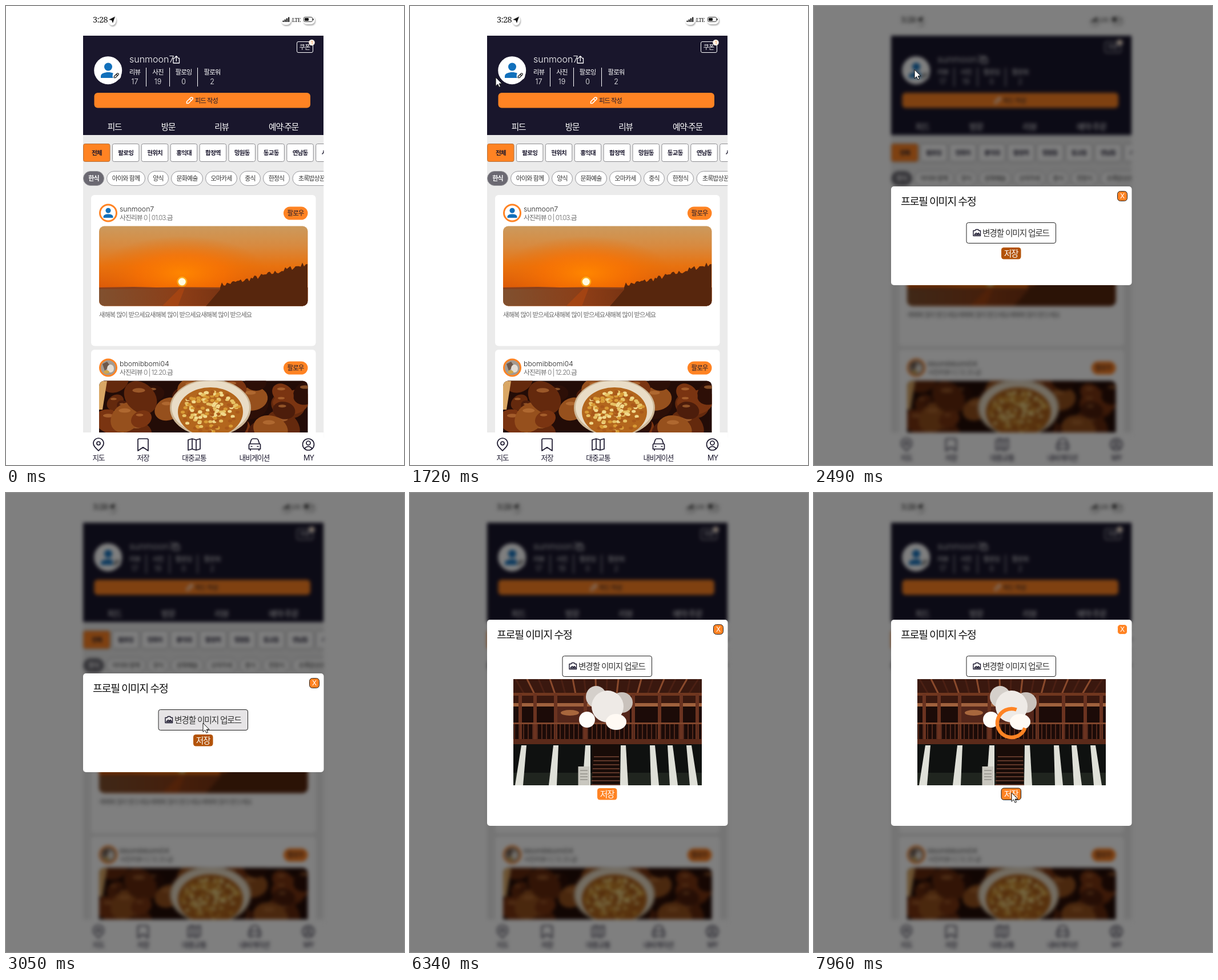
Animation, 697 px wide and 804 px high, one loop 8 s. Source, as an HTML page:

```html
<!DOCTYPE html>
<html lang="ko">
<head>
<meta charset="utf-8">
<title>프로필 이미지 수정</title>
<style>
  html, body { margin: 0; width: 100%; height: 100%; overflow: hidden; background: #fff; }
  svg { display: block; }
  text {
    font-family: Inter, "Noto Sans CJK KR", "Noto Sans CJK", sans-serif;
    letter-spacing: -.08em; white-space: pre;
  }
  .latin { letter-spacing: 0; }
  .serif { font-family: "Noto Serif", "Liberation Serif", serif; letter-spacing: -.04em; }
  .sticker { filter: drop-shadow(1px 2px 1px #0005); }
</style>
</head>
<body>
<svg id="stage" width="697" height="804" viewBox="0 0 697 804"></svg>
<script>
const LOOP = 8000;
const ORANGE = '#ff8323', NAVY = '#19162c';
const USER = 'sunmoon7', FRIEND = 'bbomibbomi04';

let seed = 7;
const random = () => (seed = (seed * 16807) % 2147483647) / 2147483647;
const repeat = (n, fn) => Array.from({ length: n }, (_, i) => fn(i)).join('');

const rect = (x, y, w, h, r, fill, extra = '') =>
  `<rect x="${x}" y="${y}" width="${w}" height="${h}" rx="${r}" fill="${fill}" ${extra}/>`;
const oval = (x, y, rx, ry, fill, extra = '') =>
  `<ellipse cx="${x}" cy="${y}" rx="${rx}" ry="${ry}" fill="${fill}" ${extra}/>`;
const path = (d, fill, extra = '') => `<path d="${d}" fill="${fill}" ${extra}/>`;
const line = (d, color, width = 1) =>
  path(d, 'none', `stroke="${color}" stroke-width="${width}" stroke-linejoin="round"`);
const label = (x, y, s, size, fill, extra = '') =>
  `<text x="${x}" y="${y}" font-size="${size}" fill="${fill}" ${extra}>${s}</text>`;
const centered = (x, y, s, size, fill, extra = '') =>
  label(x, y, s, size, fill, `text-anchor="middle" ${extra}`);
const gradient = (id, stops, attrs = 'x2="0" y2="1"', type = 'linear') =>
  `<${type}Gradient id="${id}" ${attrs}>${stops.map(([o, c, a = 1]) =>
    `<stop offset="${o}" stop-color="${c}" stop-opacity="${a}"/>`).join('')}</${type}Gradient>`;
const clip = (id, shape) => `<clipPath id="${id}">${shape}</clipPath>`;

const person = (x, y, scale, id) =>
  `<g id="${id}" fill="#1270bb" transform="translate(${x} ${y}) scale(${scale})">
    <circle cy="-6.5" r="7"/><path d="M-13 13v-3C-13 5-6 3 0 3s13 2 13 7v3z"/></g>`;
const pencil = (x, y, scale, color) =>
  `<g transform="translate(${x} ${y}) scale(${scale})">` +
  line('M-5 5v-3L2-5q1.5-1 3 0t0 3L-2 5zM0-3l3 3', color, 1.6) + '</g>';

function statusBar() {
  return label(152, 29, '3:28', 14.5, '#111', 'class="serif"') +
    '<g class="sticker">' + oval(186, 25, 7, 9, '#fff') + rect(482, 17, 17, 16, 7, '#fff') +
    rect(520, 17, 21, 15, 7, '#fff') + '</g>' +
    path('M180 24l11-5.5-4 11.5-2-5z', '#111') +
    repeat(4, i => rect(484.5 + i * 3.2, 25.5 - i * 2, 2.2, 2.5 + i * 2, .5, '#111')) +
    label(501, 28, 'LTE', 9, '#111', 'class="serif"') +
    rect(521.5, 19.5, 15, 8, 2, 'none', 'stroke="#333"') + rect(523, 21, 7, 5, 1, '#111') +
    rect(537.5, 22, 1.5, 3, .5, '#333');
}

function header() {
  const stats = [[225.5, '리뷰', 17], [266, '사진', 19], [311, '팔로잉', 0], [361, '팔로워', 2]];
  const tabs = [[190, '피드'], [284, '방문'], [377.5, '리뷰'], [486, '예약·주문']];
  return rect(135, 52, 421, 174, 0, NAVY) +
    rect(509.5, 62.5, 28, 19, 2.5, 'none', 'stroke="#fff"') + centered(523, 75.5, '쿠폰', 11, '#fff') +
    oval(535.5, 64, 5.3, 5.3, '#fff3e8') + centered(535.5, 66.5, '1', 7, ORANGE) +
    oval(178.7, 112.7, 24.5, 24.5, '#fff') + person(179, 113, 1, 'avatar') +
    oval(194, 122, 7.5, 7.5, '#fff') + pencil(193, 122, .75, '#111') +
    label(216, 99, USER, 16, '#fff', 'class="latin" font-weight="300"') +
    line('M295.5 91.500h-2.500v8.500h10.500v-8.500h-2.500M298.300 97v-9M295.500 90.500l2.800-2.800 2.800 2.800', '#fff', 1.3) +
    stats.map(([x, name, n]) => centered(x, 120, name, 11.5, '#fff') +
      centered(x, 137, n, 12.5, '#fff', 'class="latin" font-weight="300"')).join('') +
    line('M245.500 108v33M286.500 108v33M335.500 108v33', '#fff') +
    rect(154.5, 152, 378.5, 26.5, 6, ORANGE) + pencil(321.5, 165.5, 1, '#fff') +
    label(331, 169.5, '피드 작성', 11.2, NAVY) +
    tabs.map(([x, s]) => centered(x, 216.5, s, 14.6, '#fff')).join('');
}

function filters() {
  const areas = ['전체', '팔로잉', '현위치', '홍익대', '합정역', '망원동', '동교동', '연남동', '서교동'];
  const tags = [[135, 37, '한식'], [176, 68, '아이와 함께'], [248, 37, '양식'], [289, 56, '문화예술'],
    [349, 56, '오마카세'], [409, 37, '중식'], [450, 47, '한정식'], [501.5, 67, '초록밥상꾼']];
  return areas.map((s, i) => {
    const x = 135.5 + i * 50.9;
    return rect(x, 241.5, 46.5, 31, 3, i ? '#fff' : ORANGE, `stroke="${i ? '#8c8c90' : '#b5713c'}"`) +
      centered(x + 23.3, 261, s, 10.6, NAVY, 'font-weight="700"');
  }).join('') + tags.map(([x, w, s], i) =>
    rect(x + .5, 289.5, w - 1, 25, 12.5, i ? '#fff' : '#6b6972', 'stroke="#98989c"') +
    centered(x + w / 2, 305.7, s, 11, i ? '#333' : '#fff', i ? '' : 'font-weight="700"')).join('');
}

function postHead(y, name, date) {
  return label(199, y - 3.5, name, 12.3, '#222', 'class="latin" font-weight="300"') +
    label(199, y + 12, `사진리뷰 0 | ${date}`, 11.8, '#666', 'font-weight="300"') +
    rect(486, y - 11.5, 42.5, 23, 11.5, ORANGE) + centered(507, y + 4, '팔로우', 11.5, NAVY);
}

function sunset() {
  const trees = repeat(52, i => {
    const x = 375 + i * 3;
    return `L${x} ${493 - 38 * (i / 51) ** 1.2 - random() * 9}`;
  });
  return '<g clip-path="url(#photoA)">' + rect(163, 385, 366, 141, 0, 'url(#sky)') +
    oval(308, 468, 150, 65, 'url(#glow)') + rect(163, 493, 366, 33, 0, 'url(#sea)') +
    path('M163 493l60-1 40 1 45-.5 90 .5v3H163z', '#87401d') +
    path('M305 494h8l-12 32h-28z', '#b4490f', 'opacity=".6"') +
    path(`M350 526L375 497${trees}V526z`, '#57260d') +
    oval(308.3, 483, 9, 9, '#ffc02a', 'opacity=".7"') + oval(308.3, 483, 6.5, 6.5, '#fffbe0') + '</g>';
}

function food() {
  const browns = ['#7a3411', '#4d1d0b', '#96501d', '#64290d', '#2d0f07'];
  const bits = ['#e7c265', '#d89a35', '#f1d98c', '#a9591a'];
  const pieces = repeat(38, i => {
    const x = 163 + random() * 365, y = 657 + random() * 92, r = 10 + random() * 15;
    return oval(x, y, r * 1.3, r, browns[i % 5], `transform="rotate(${random() * 90 - 45} ${x} ${y})"`) +
      oval(x - 3, y - r / 2, r * .45, r * .16, '#c0793d', 'opacity=".6"');
  });
  const garlic = repeat(150, i => {
    const a = random() * 6.283, d = Math.sqrt(random());
    return oval(358 + 52 * d * Math.cos(a), 711 + 36 * d * Math.sin(a), 3.6, 2.6, bits[i % 4]);
  });
  return '<g clip-path="url(#photoB)">' + rect(163, 656, 366, 92, 0, '#230c07') + pieces +
    path('M163 657h14l-8 50h-6z', '#d9a765') +
    oval(358, 704, 71, 50, '#cdb797') + oval(358, 703, 68, 47, '#e9dcc6') +
    oval(358, 711, 57, 43, '#b3661d') + garlic + '</g>';
}

function posts() {
  const wish = '새해복 많이 받으세요';
  return rect(149, 331, 393.5, 264.5, 6, '#fff') +
    oval(179, 362.5, 14.5, 14.5, '#fff', `stroke="${ORANGE}" stroke-width="3"`) +
    person(179, 362.5, .65, 'thumb') + postHead(363, USER, '01.03.금') + sunset() +
    label(163, 545, wish + wish + wish, 11.2, '#666', 'font-weight="300"') +
    rect(149, 602, 393.5, 160, 6, '#fff') +
    oval(179, 633.5, 14.5, 14.5, '#a39a91', `stroke="${ORANGE}" stroke-width="3"`) +
    path('M169 627l8-4 5 7-9 9z', '#6d584b') + oval(183, 635, 6, 7, '#e3ddd5') + oval(176, 641, 5, 3, '#d2a54a') +
    postHead(634, FRIEND, '12.20.금') + food();
}

function navBar() {
  const items = [[162, '지도'], [240, '저장'], [329.5, '대중교통'], [435, '내비게이션'], [530, 'MY']];
  const icons = 'M162 779c-5-5-9-8-9-13a9 9 0 0 1 18 0c0 5-4 8-9 13zM159 766a3 3 0 1 0 6 0a3 3 0 1 0-6 0' +
    'M231 779V760q0-2 2-2h14q2 0 2 2v19l-9-6z' +
    'M319 760l7-2 7 2 7-2v18l-7 2-7-2-7 2zM326 758v18M333 760v18' +
    'M427 767l2.500-7q.7-2 3-2h6q2.300 0 3 2l2.500 7M427 767h17q1.500 0 1.500 2v7h-20v-7q0-2 1.500-2zM428 776v3M443 776v3M428.500 771.500h3M439.500 771.500h3' +
    'M519.500 768a10 10 0 1 0 20 0a10 10 0 1 0-20 0M526 765.500a3.500 3.500 0 1 0 7 0a3.500 3.500 0 1 0-7 0M523 775q6.500-7 13 0';
  return rect(135, 747, 421, 57, 0, '#fff') + line(icons, NAVY, 1.7) +
    items.map(([x, s]) => centered(x, 795.5, s, 12.6, NAVY)).join('');
}

function pavilion() {
  const beams = repeat(17, i => line(`M${185 + i * 20} 326L${200 + i * 18} 352`, i % 2 ? '#8a4a2c' : '#4b2014', 3));
  const columns = [190, 216, 252, 304, 388, 434, 472, 500];
  const pillars = [[195, -8], [251, -5], [307, -2], [369, 2], [420, 5], [451, 7], [484, 9]];
  return '<g clip-path="url(#photoC)">' + rect(181, 326, 330, 186, 0, '#1c0b08') +
    rect(181, 326, 330, 46, 0, '#3a180f') + beams +
    rect(181, 350, 330, 5, 0, '#71371f') + rect(181, 368, 330, 6, 0, '#a0613d') +
    rect(255, 374, 130, 30, 0, '#54261a') + oval(280, 385, 16, 5, '#a8673d') +
    columns.map(x => rect(x, 352, 6, 80, 0, '#6b3320')).join('') +
    rect(181, 402, 330, 3, 0, '#81462c') + rect(181, 431, 330, 9, 0, '#5b2a1a') +
    repeat(42, i => rect(182 + i * 8, 405, 2, 27, 0, '#53281b')) +
    rect(181, 440, 330, 72, 0, '#0f1110') + rect(181, 490, 330, 22, 0, '#20251f') +
    pillars.map(([x, lean]) => path(`M${x} 442h9l${lean + 2} 70h-14z`, '#dfe0d8')).join('') +
    rect(319, 440, 48, 72, 0, '#180c08') +
    repeat(8, i => rect(322 - i * .7, 461 + i * 7, 44 + i, 2, 0, '#60382a')) +
    rect(294.5, 479, 20, 33, 0, '#c9c7bf') +
    line('M298 486h13M298 492h13M298 497h13M298 502h13', '#77756f') +
    oval(326, 357, 18, 19, '#d5d0cb') + oval(371, 367, 19, 18, '#c9c2bc') +
    oval(346, 374, 28, 28, '#eeeae6') + oval(310, 397, 14, 14, '#fffdf9') + oval(361, 401, 18, 14, '#fffaf4') + '</g>';
}

function dialog() {
  return rect(135, 316, 421.5, 173, 5, '#fff', 'id="panel"') + '<g id="top">' +
    label(152, 348.5, '프로필 이미지 수정', 18.5, '#111', 'font-weight="500"') +
    rect(531.5, 324.5, 17, 17, 5, ORANGE, 'id="close"') + centered(540, 337.3, 'X', 12, '#fff', 'class="latin"') +
    rect(267, 379.5, 156.5, 36, 3.5, '#fff', 'id="upload" stroke="#222"') +
    line('M279 393.500h3l1.500-2h4l1.500 2h2.500v9h-12.500zM281 400.500l3-3 2 2 2-2 2 3z', NAVY, 1.4) +
    label(295, 402.5, '변경할 이미지 업로드', 14.7, '#333', 'font-weight="300"') + '</g>' +
    `<g id="photo">${pavilion()}</g><g id="save">` +
    rect(328, 423, 34.5, 20.5, 4.5, ORANGE, 'id="saveBox"') + centered(345, 438.5, '저장', 14.7, '#fff') + '</g>' +
    `<g id="spinner"><circle cx="346" cy="403" r="25" fill="none" stroke="${ORANGE}" stroke-width="6.5"
      pathLength="4" stroke-dasharray="3 1" transform="rotate(-45 346 403)"/></g>`;
}

const defs = '<defs>' +
  gradient('sky', [[0, '#cb9a5e'], [.25, '#d88a3f'], [.5, '#e8720f'], [.77, '#dc5a08']]) +
  gradient('glow', [[0, '#ff8600'], [.5, '#fb7200', .65], [1, '#e86a00', 0]], '', 'radial') +
  gradient('sea', [[0, '#80502f'], [.4, '#8c3d16'], [1, '#4f210c']], '') +
  clip('phone', rect(135, 0, 421.5, 804, 0, '#000')) +
  clip('photoA', rect(163, 385.5, 365.5, 140, 9, '#000')) +
  clip('photoB', rect(163, 656.5, 365.5, 130, 9, '#000')) +
  clip('photoC', rect(181, 326, 330, 186, 0, '#000')) + '</defs>';

stage.innerHTML = defs +
  `<g id="page"><g clip-path="url(#phone)">${rect(135, 226, 421.5, 530, 0, '#ebebeb')}${statusBar()}${header()}` +
  `${filters()}${posts()}${navBar()}</g></g>` +
  `<g id="modal">${rect(0, 0, 697, 804, 0, '#000', 'opacity=".5"')}${dialog()}</g>` +
  `<g id="cursor">${path('M0 0V15.500l3.600-3.400 2.400 5.300 2.500-1.100-2.400-5.200H11z', '#fff', 'stroke="#111"')}</g>`;

const $ = id => document.getElementById(id);
const set = (id, name, value) => $(id).setAttribute(name, value);
const show = (id, on) => set(id, 'visibility', on ? 'visible' : 'hidden');

// Pointer stops: time, x, y
const enter = [[260, 642, 759], [400, 520, 640], [600, 310, 465], [780, 192, 375], [880, 165, 348],
  [1000, 182, 328], [1090, 190.5, 333.5], [1230, 215, 362], [1330, 231, 378], [1440, 222, 330], [1580, 180, 210],
  [1720, 150, 125], [1860, 160, 108], [2000, 172, 110], [2430, 176, 112], [2490, 176, 111], [2560, 178, 148],
  [2630, 215, 260], [2700, 262, 373], [2770, 300, 390], [2900, 330, 399], [3050, 345, 403],
  [3450, 345, 403], [3560, 335, 417], [3720, 260, 400], [3900, 150, 362], [4060, 102, 340]];
const back = [[6800, 10, 657], [6940, 90, 630], [7080, 220, 580], [7220, 335, 535], [7300, 376, 519],
  [7400, 360, 521], [7490, 346, 525], [8000, 346, 525]];

function along(stops, t) {
  const i = Math.max(1, stops.findIndex(s => s[0] >= t));
  const [t0, x0, y0] = stops[i - 1], [t1, x1, y1] = stops[i];
  const k = (t - t0) / (t1 - t0);
  return [x0 + (x1 - x0) * k, y0 + (y1 - y0) * k];
}

function render(t) {
  const open = t >= 2490, loaded = t >= 6340, saving = t >= 7820;
  const moving = t >= 260 && t < 4060 ? enter : t >= 6800 ? back : null;
  show('cursor', moving);
  if (moving) set('cursor', 'transform', `translate(${along(moving, t)})`);

  set('avatar', 'fill', t >= 1800 && !open ? '#0a5ba8' : '#1270bb');
  $('page').style.filter = open ? 'blur(3px)' : 'none';
  $('modal').style.display = open ? '' : 'none';

  set('panel', 'y', loaded ? 222 : 316);
  set('panel', 'height', loaded ? 361 : 173);
  set('top', 'transform', `translate(0 ${loaded ? -94 : 0})`);
  set('save', 'transform', `translate(0 ${loaded ? 94 : 0})`);
  show('photo', loaded && open);
  set('close', 'stroke', t < 3450 || (loaded && !saving) ? '#222' : '#fff');
  set('upload', 'fill', t >= 2770 && !loaded ? '#e6e4e6' : '#fff');
  set('saveBox', 'fill', loaded ? ORANGE : '#b35309');
  set('saveBox', 'stroke', saving ? '#111' : 'none');
  show('spinner', saving);
  set('spinner', 'transform', `rotate(${(t - 7780) * .36} 346 403)`);
}

const start = performance.now();
(function tick() {
  render((performance.now() - start) % LOOP);
  requestAnimationFrame(tick);
})();
</script>
</body>
</html>
```
